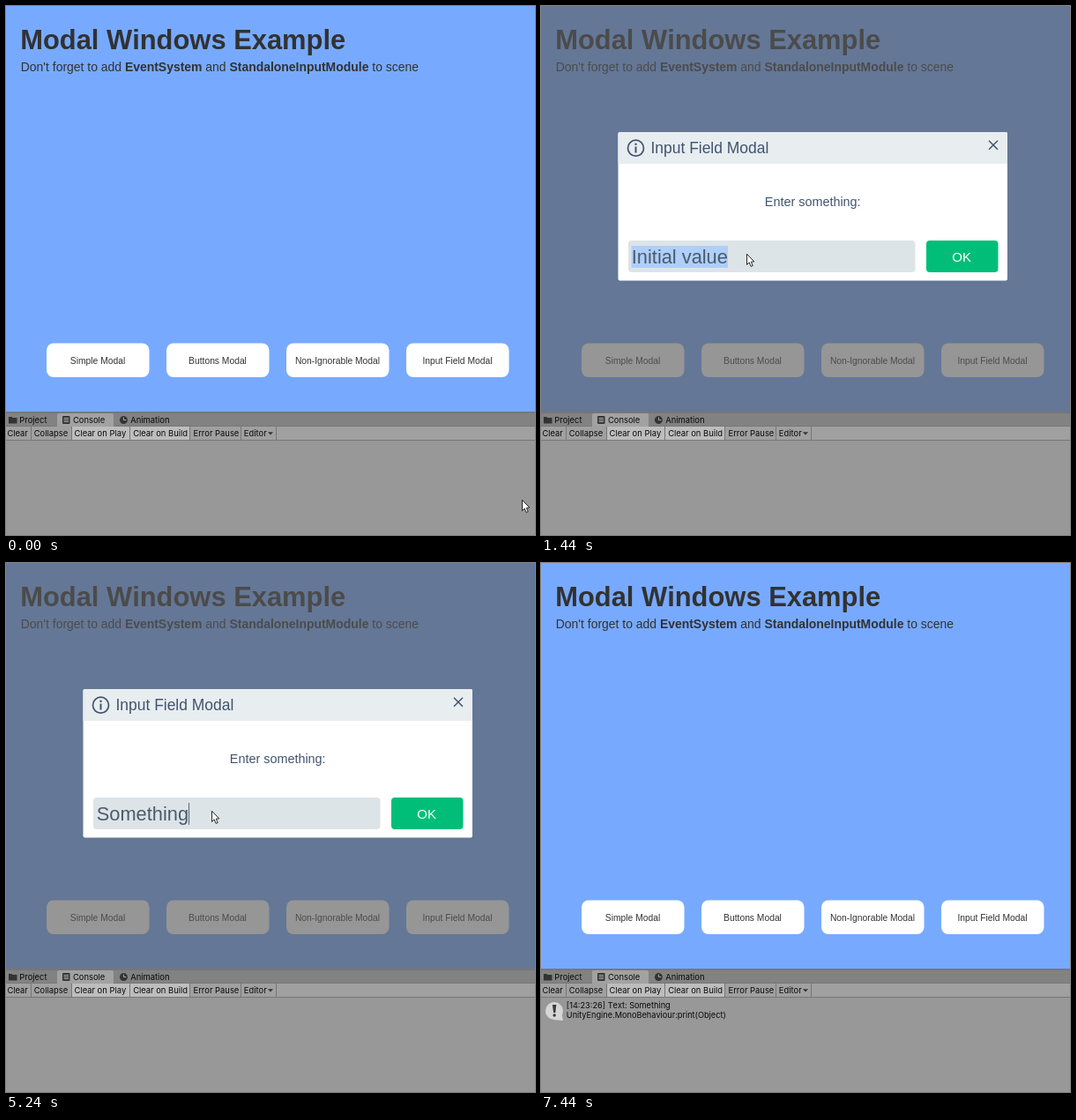
An HTML page with a canvas that plays this animation: 600x600 px, repeating every 7.72 s.

```html
<!DOCTYPE html>
<html lang="en">
<head>
<meta charset="utf-8">
<title>Modal Windows Example</title>
<style>
  html, body { margin: 0; width: 100%; height: 100%; overflow: hidden; background: #77aaff; }
  canvas { display: block; width: 600px; height: 600px; }
</style>
</head>
<body>
<canvas id="stage"></canvas>
<script>
const LOOP = 7720, STEP = 40;
const SANS = '"Liberation Sans", Arial, sans-serif';
const UI = 'Inter, Roboto, sans-serif';
const INK = '#323232', SLATE = '#40536e';
const FADE = 270, OPEN = 696, CLOSE = 6440;
const FOCUS = 1440, LOGGED = 6440;
const WORD = 'Something';
const KEYS = [3200, 3320, 3520, 3600, 3920, 4680, 4840, 5040, 5200];

// Pointer stops: time, x, y
const PATH = [
  [0, 585, 560], [660, 501, 411], [860, 501, 411], [1400, 233, 281],
  [5900, 233, 281], [6380, 461, 286], [6680, 461, 286], [7000, 8, 530], [7040, -20, 545],
  [7160, -12, 552], [7440, 25, 601], [LOOP, 25, 640]
];

const canvas = document.getElementById('stage');
const ctx = canvas.getContext('2d');
const dpr = window.devicePixelRatio || 1;
canvas.width = canvas.height = 600 * dpr;

const clamp = v => Math.max(0, Math.min(1, v));
const smooth = v => { v = clamp(v); return v * v * (3 - 2 * v); };

function rect(x, y, w, h, color) {
  ctx.fillStyle = color;
  ctx.fillRect(x, y, w, h);
}

function round(x, y, w, h, r, color) {
  ctx.fillStyle = color;
  ctx.beginPath();
  ctx.roundRect(x, y, w, h, r);
  ctx.fill();
}

function line(points, color, width) {
  ctx.strokeStyle = color;
  ctx.lineWidth = width;
  ctx.beginPath();
  points.forEach(([x, y], i) => i ? ctx.lineTo(x, y) : ctx.moveTo(x, y));
  ctx.stroke();
}

function disc(x, y, r, color) {
  ctx.fillStyle = color;
  ctx.beginPath();
  ctx.arc(x, y, r, 0, 7);
  ctx.fill();
}

// Returns the x where the text ends
function text(str, x, y, size, color, { bold = false, align = 'left', family = SANS } = {}) {
  ctx.font = `${bold ? 'bold ' : ''}${size}px ${family}`;
  ctx.textAlign = align;
  ctx.fillStyle = color;
  ctx.fillText(str, x, y);
  return x + ctx.measureText(str).width;
}

function drawScene(p) {
  rect(0, 0, 600, 461, '#77aaff');
  text('Modal Windows Example', 16.2, 49, 30.9, INK, { bold: true });
  const parts = ["Don't forget to add ", 'EventSystem', ' and ', 'StandaloneInputModule', ' to scene'];
  let x = 16.8;
  parts.forEach((s, i) => { x = text(s, x, 74, 13.94, INK, { bold: i % 2 === 1 }); });
  ['Simple', 'Buttons', 'Non-Ignorable', 'Input Field'].forEach((name, i) => {
    const left = 46 + 136 * i;
    round(left, 382.5, 116.5, 38.5, 8, '#fff');
    text(name + ' Modal', left + 58, 405.8, 10.3, INK, { align: 'center' });
  });
  rect(0, 0, 600, 461, `rgba(90,90,90,${0.635 * p})`);
}

function typed(t) {
  const n = KEYS.filter(k => k <= t).length;
  return { value: n ? WORD.slice(0, n) : 'Initial value', last: n ? KEYS[n - 1] : 0 };
}

function drawModal(t, p) {
  if (p <= 0) return;
  const scale = 1.2 - 0.2 * p;
  ctx.save();
  ctx.translate(308.25, 227.25);
  ctx.scale(scale, scale);
  ctx.translate(-308.25, -227.25);

  // The panel fades in later than what lies on it
  ctx.globalAlpha = Math.pow(p, 1.6);
  round(87.5, 143, 441.5, 168.5, 2, '#fff');
  ctx.globalAlpha = Math.pow(p, 1.2);
  round(87.5, 143, 441.5, 36, [2, 2, 0, 0], '#e8edf0');

  ctx.strokeStyle = SLATE;
  ctx.lineWidth = 1.7;
  ctx.beginPath();
  ctx.arc(107.5, 161.2, 9, 0, 7);
  ctx.stroke();
  rect(106.5, 159.5, 2, 7, SLATE);
  disc(107.5, 156.8, 1.2, SLATE);

  text('Input Field Modal', 124.5, 167.3, 17.45, SLATE);
  line([[508, 152.7], [518, 162.7]], SLATE, 1.5);
  line([[518, 152.7], [508, 162.7]], SLATE, 1.5);
  text('Enter something:', 308.2, 227, 14.4, SLATE, { align: 'center' });

  round(99, 266, 325.5, 36, 4, '#dde4e7');
  const { value, last } = typed(t);
  if (t >= FOCUS && !last) rect(102.5, 272, 109.5, 25, '#afcff9');
  const end = text(value, 102.8, 292.3, 21.8, '#4b5a6c');
  if (last && t < CLOSE - STEP && (t - last) % 1160 < 560) rect(end, 272, 1, 25, '#5b6878');

  round(437, 266, 81.5, 36, 4, '#00be78');
  text('OK', 477.2, 289.8, 15, '#fff', { align: 'center' });
  ctx.restore();
}

function drawConsole(t) {
  const label = (s, x, y, size = 9.4) => text(s, x, y, size, '#0a0a0a', { family: UI });
  rect(0, 460.5, 600, 140, '#999898');
  rect(0, 460.5, 600, 16, '#828282');
  rect(0, 460.5, 600, 1, '#6c6c6c');
  round(58, 462, 64, 15, [2, 2, 0, 0], '#a2a2a2');
  rect(0, 476, 600, 17, '#a0a0a0');
  rect(75, 477, 134, 15, '#bdbdbd');
  rect(0, 476, 58, 1, '#777');
  rect(122, 476, 478, 1, '#777');
  rect(0, 492, 600, 1, '#777');
  [28.5, 74.5, 140.5, 208.5, 266.5, 306.5].forEach(x => rect(x - 0.5, 477, 1, 15, '#777'));

  // Tab icons
  rect(3, 466, 4, 2, '#333');
  rect(3, 467, 9.5, 6.5, '#333');
  round(64, 465, 8.5, 9, 1, '#333');
  [467, 469, 471].forEach(y => rect(65.5, y, 5.5, 1, '#b0b0b0'));
  disc(133.4, 469.6, 4.5, '#333');
  line([[133.4, 466.5], [133.4, 469.6], [136.4, 469.6]], '#aaa', 1);

  label('Project', 15.2, 473.3);
  label('Console', 76, 473.3);
  label('Animation', 141.2, 473.3);
  [['Clear', 1.4], ['Collapse', 31.7], ['Clear on Play', 77.6], ['Clear on Build', 144.2],
   ['Error Pause', 212.6], ['Editor', 269.8]].forEach(([s, x]) => label(s, x, 488.3));
  ctx.fillStyle = '#333';
  ctx.beginPath();
  ctx.moveTo(297, 483.3);
  ctx.lineTo(303, 483.3);
  ctx.lineTo(300, 486.5);
  ctx.fill();

  if (t < LOGGED) return;
  disc(15, 508, 10, '#d6d6d6');
  ctx.beginPath();
  ctx.moveTo(23, 509);
  ctx.lineTo(25, 519);
  ctx.lineTo(14, 518);
  ctx.fill();
  ctx.fillStyle = '#3a3a3a';
  ctx.beginPath();
  ctx.moveTo(13, 501);
  ctx.lineTo(17.4, 501);
  ctx.lineTo(16.3, 510);
  ctx.lineTo(14.1, 510);
  ctx.fill();
  disc(15.2, 513, 1.7, '#3a3a3a');
  label('[14:23:26] Text: ' + WORD, 28.8, 504.6, 9.2);
  label('UnityEngine.MonoBehaviour:print(Object)', 28.8, 516.3, 9.2);
}

function drawPointer(t) {
  const i = Math.max(1, PATH.findIndex(stop => stop[0] > t));
  const [t0, x0, y0] = PATH[i - 1], [t1, x1, y1] = PATH[i];
  const k = smooth((t - t0) / (t1 - t0));
  ctx.save();
  ctx.translate(Math.round(x0 + (x1 - x0) * k), Math.round(y0 + (y1 - y0) * k));
  ctx.beginPath();
  [[0.5, 0.3], [0.5, 12.4], [3.2, 9.9], [5.1, 14.4], [7.2, 13.5], [5.3, 9.2], [8.8, 8.9]]
    .forEach(([x, y]) => ctx.lineTo(x, y));
  ctx.closePath();
  ctx.fillStyle = '#fff';
  ctx.fill();
  ctx.strokeStyle = '#111';
  ctx.lineWidth = 0.9;
  ctx.stroke();
  ctx.restore();
}

function frame(now) {
  const t = Math.floor((now % LOOP) / STEP) * STEP;
  const p = smooth((t - OPEN) / FADE) - smooth((t - CLOSE) / FADE);
  ctx.setTransform(dpr, 0, 0, dpr, 0, 0);
  ctx.fontKerning = 'none';
  drawScene(p);
  drawModal(t, p);
  drawConsole(t);
  drawPointer(t);
}

const start = performance.now();
function tick() {
  frame(performance.now() - start);
  requestAnimationFrame(tick);
}
tick();
</script>
</body>
</html>
```
